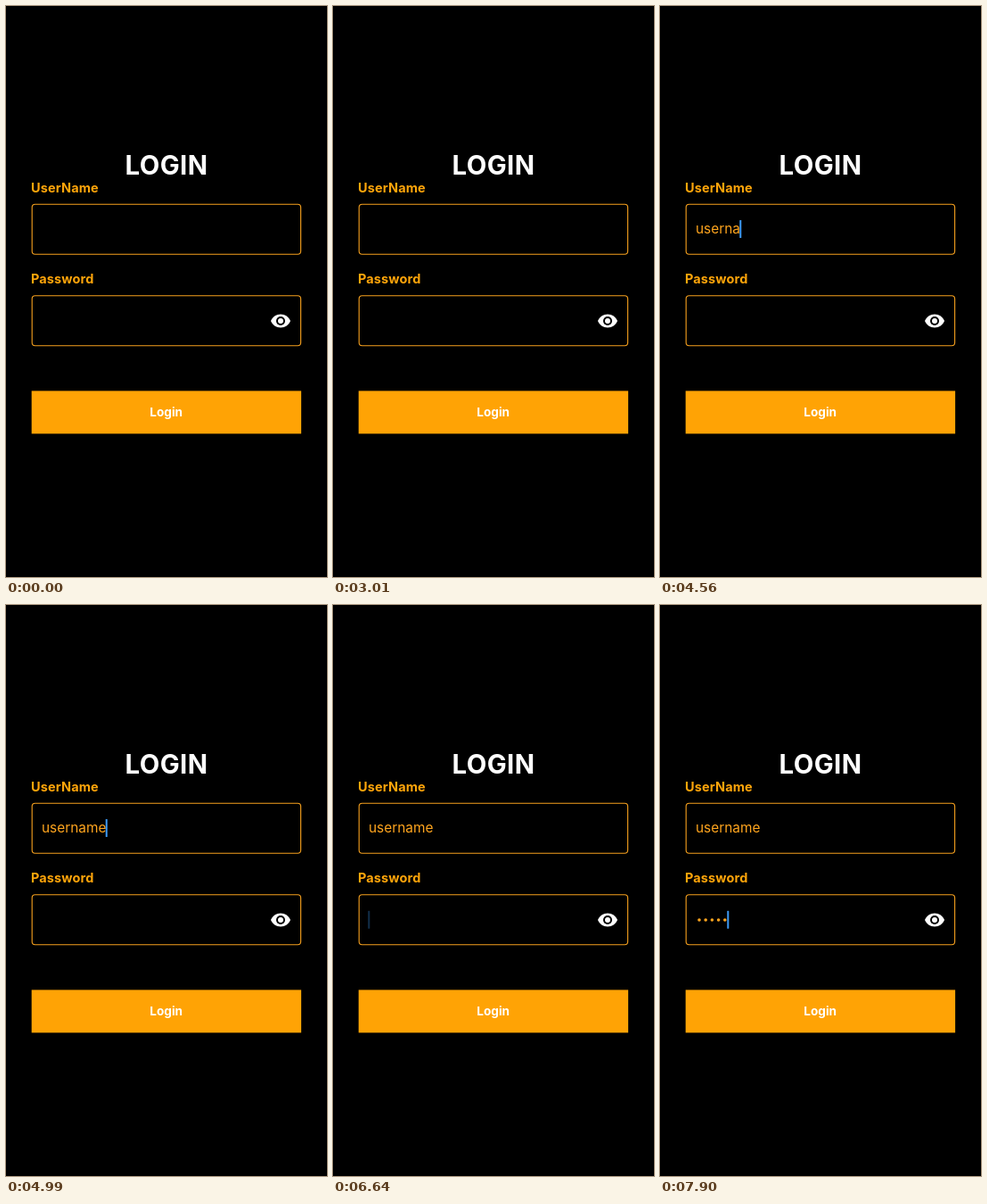
Write an HTML page that moves like this. It is 360 px wide and 640 px high and loops after 8000 ms.

```html
<!DOCTYPE html>
<html lang="en">
<head>
<meta charset="utf-8">
<title>Login form</title>
<style>
  html, body { margin: 0; width: 100%; height: 100%; overflow: hidden; background: #000; }
  svg { display: block; width: 360px; height: 640px; font-family: Inter, sans-serif; }
  .label { font-weight: 700; font-size: 14.5px; letter-spacing: .12px; fill: #ffa50a; }
  .field { fill: none; stroke: #f5a01e; stroke-width: 1.1; }
  .entry { font-size: 15.4px; fill: #ffa51e; }
  .title, .action { font-weight: 700; fill: #fff; text-anchor: middle; }
  .title { font-size: 29.3px; letter-spacing: .4px; }
  .action { font-size: 13.6px; }
</style>
</head>
<body>
<svg viewBox="0 0 360 640">
  <rect width="360" height="640"/>
  <text class="title" x="180" y="189">LOGIN</text>
  <text class="label" x="28" y="208.8">UserName</text>
  <rect class="field" x="29.2" y="222.2" width="301.4" height="56" rx="3.5"/>
  <text class="label" x="28" y="311.3">Password</text>
  <rect class="field" x="29.2" y="324.8" width="301.4" height="56" rx="3.5"/>
  <g transform="translate(308 353)" fill="#fff">
    <path d="M0-7.5C-5-7.5-9.27-4.39-11 0C-9.27 4.39-5 7.5 0 7.5S9.27 4.39 11 0C9.27-4.39 5-7.5 0-7.5z"/>
    <circle r="5" fill="#000"/>
    <circle r="3"/>
  </g>
  <rect x="28.7" y="431.4" width="302.4" height="48" fill="#ffa305"/>
  <text class="action" x="179.7" y="460">Login</text>
  <text class="entry" id="name" x="40" y="255"></text>
  <g id="dots" fill="#ffa51e"></g>
  <rect id="caret" width="2" height="20" rx=".6" fill="#3d9af5"/>
</svg>
<script>
const LOOP = 8000, LEFT = 40, DOT_STEP = 7.2;
const NAME_FOCUS = 1275, PASSWORD_FOCUS = 5790, FADE_IN = 110, BLINK = 1080;
const userName = 'username';

// Key presses come in evenly spaced bursts.
const burst = (start, count, gap) => Array.from({ length: count }, (_, i) => start + i * gap);
const nameKeys = [...burst(3210, 4, 185), ...burst(4400, 4, 160)];
const passwordKeys = [...burst(6740, 4, 180), 7900];
const caretResets = [NAME_FOCUS, ...nameKeys, PASSWORD_FOCUS, ...passwordKeys];

const [nameText, dots, caret] = ['name', 'dots', 'caret'].map(id => document.getElementById(id));
const typed = (keys, t) => keys.filter(time => time <= t).length;

// Each focus or key press restarts the blink: lit, dimming, dark, returning.
function caretOpacity(t) {
  if (t < NAME_FOCUS - FADE_IN) return 0;
  const reset = caretResets.findLast(time => time <= t) ?? NAME_FOCUS;
  const phase = (t - reset + BLINK) % BLINK;
  return phase < 530 ? 1 : phase < 635 ? .5 : phase < 850 ? 0 : .3;
}

dots.innerHTML = passwordKeys
  .map((_, i) => `<circle cx="${44 + i * DOT_STEP}" cy="353" r="1.8"/>`).join('');

function draw(t) {
  nameText.textContent = userName.slice(0, typed(nameKeys, t));
  const dotCount = typed(passwordKeys, t);
  [...dots.children].forEach((dot, i) => dot.setAttribute('opacity', i < dotCount ? 1 : 0));

  const inPassword = t >= PASSWORD_FOCUS;
  const width = inPassword ? dotCount * DOT_STEP : nameText.getComputedTextLength();
  caret.setAttribute('x', LEFT - .7 + width);
  caret.setAttribute('y', inPassword ? 342.8 : 240);
  caret.setAttribute('opacity', caretOpacity(t));
}

const start = performance.now();
function tick() {
  draw((performance.now() - start) % LOOP);
  requestAnimationFrame(tick);
}
tick();
</script>
</body>
</html>
```
